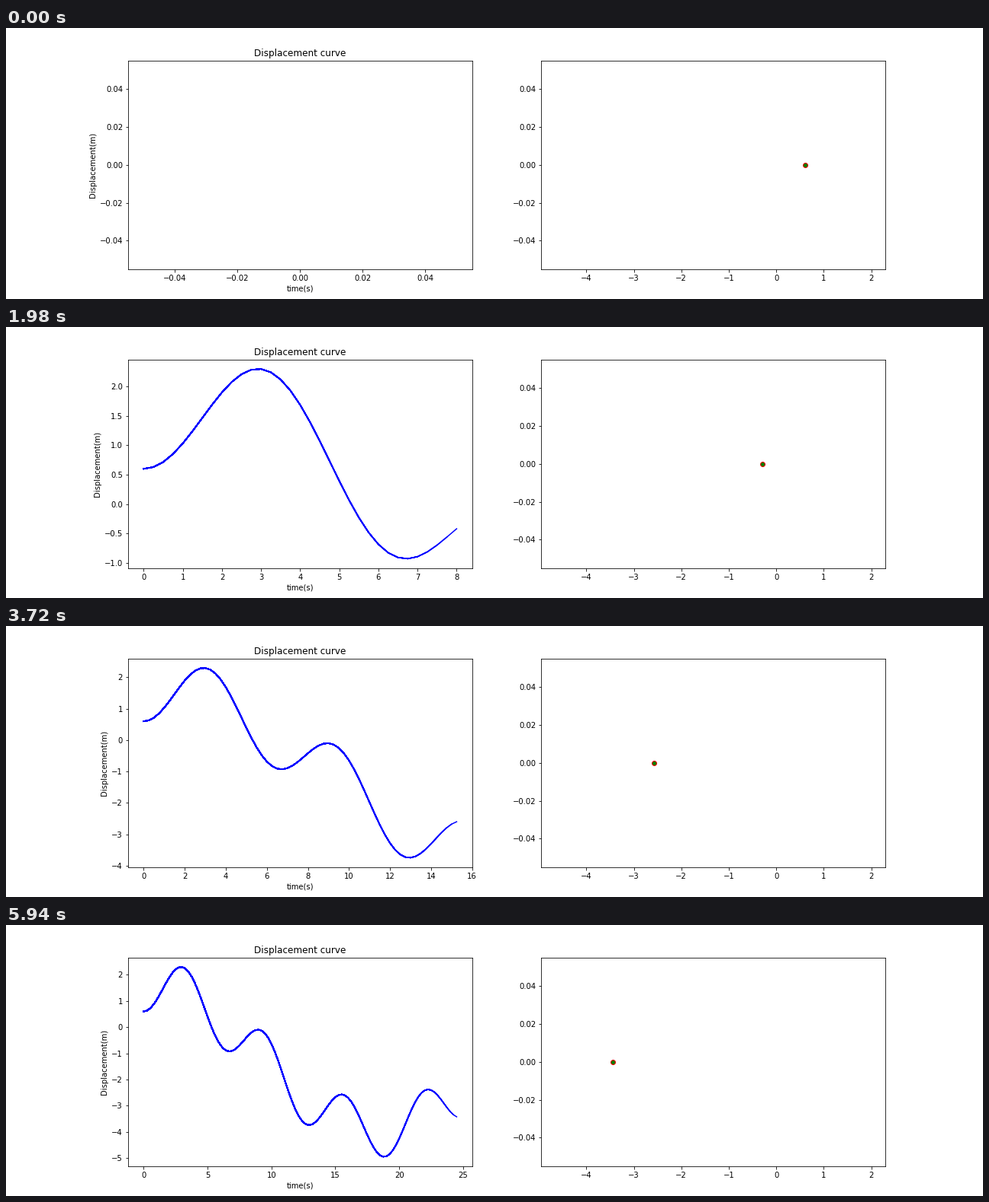
Write a matplotlib script that moves like this. It is 1280 px wide and 356 px high and loops after 6000 ms.

```python
import numpy as np
import matplotlib.pyplot as plt
from matplotlib.animation import FuncAnimation

WIDTH, HEIGHT, DPI = 1280, 356, 72
FRAMES = 100
STEP = 0.25      # seconds of motion per frame
START = 0.6      # displacement at rest
REST = -1.15     # equilibrium of the spring
OMEGA = 0.17     # natural frequency; the driving frequency is 1


def displacement(t):
    """Undamped spring released at START and driven by cos(t)."""
    drive = 1 / (1 - OMEGA ** 2)
    swing = START + drive - REST
    return REST + swing * np.cos(OMEGA * t) - drive * np.cos(t)


time = np.arange(FRAMES) * STEP
pos = displacement(time)

fig, (curve_ax, mass_ax) = plt.subplots(
    1, 2, figsize=(WIDTH / DPI, HEIGHT / DPI), dpi=DPI)

curve_ax.set_title("Displacement curve")
curve_ax.set_xlabel("time(s)")
curve_ax.set_ylabel("Displacement(m)")

# Each step lays a longer curve over the earlier ones, so old parts look heavier.
curves = [
    curve_ax.plot(time[:n], pos[:n], color="blue", lw=1.5, visible=False)[0]
    for n in range(1, FRAMES)
]

mass_ax.set_xlim(pos.min(), pos.max())
mass_ax.set_ylim(-0.055, 0.055)
mass, = mass_ax.plot([START], [0], "o", ms=6, mfc="green", mec="red", mew=1)


def update(frame):
    for n, curve in enumerate(curves, start=1):
        curve.set_visible(n <= frame)
    curve_ax.relim(visible_only=True)
    curve_ax.autoscale_view()
    mass.set_data([pos[frame]], [0])
    return [*curves, mass]


def reset():
    return update(0)


anim = FuncAnimation(fig, update, frames=FRAMES, init_func=reset,
                     interval=60, repeat=True, repeat_delay=0, blit=False)

plt.show()
```
